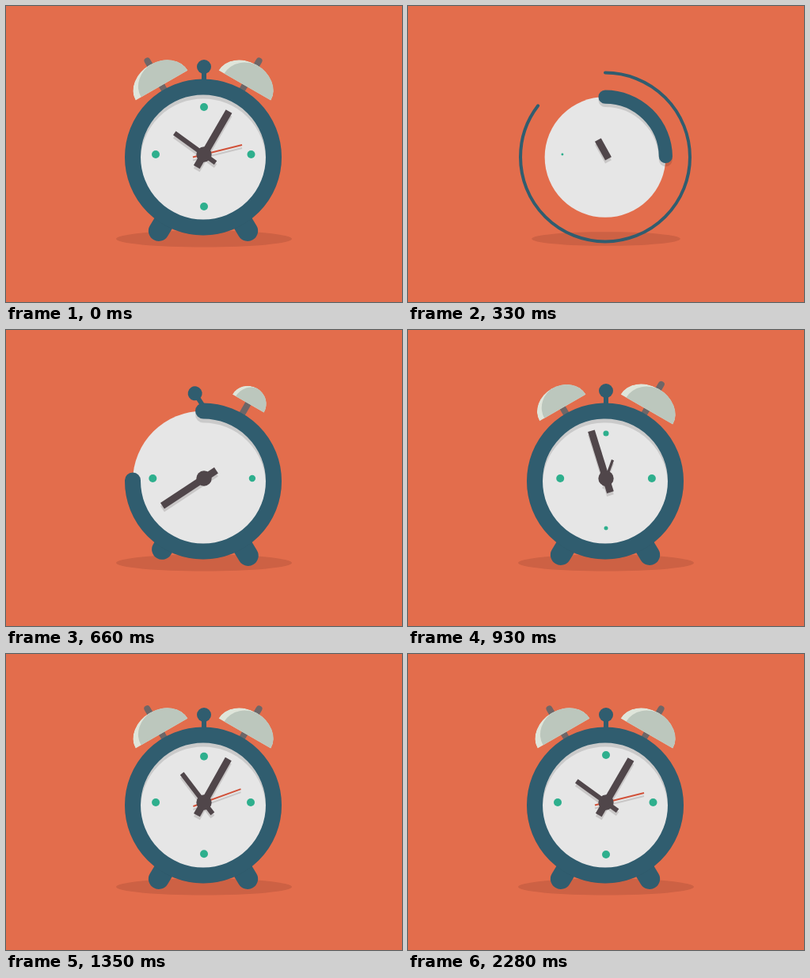
Write an HTML page with a canvas that moves like this. It is 500 px wide and 375 px high and loops after 2.58 s.

```html
<!DOCTYPE html>
<html lang="en">
<head>
<meta charset="utf-8">
<title>Alarm clock</title>
<style>
  html, body { margin: 0; width: 100%; height: 100%; overflow: hidden; background: #e36d4c; }
  canvas { display: block; }
</style>
</head>
<body>
<canvas id="stage" width="500" height="375"></canvas>
<script>
const ctx = document.getElementById('stage').getContext('2d');
const LOOP = 2580, STEP = 30, TAU = Math.PI * 2, DEG = Math.PI / 180;
const CENTER = [249, 191.5], PIVOT = [250, 188];
const TEAL = '#305d6f', DARK = '#50464a', METAL = '#6e6667', SHADE = '#c9c7c7';

// Progress helpers
const span = (t, start, length) => Math.min(1, Math.max(0, (t - start) / length));
const easeOut = (u, power = 3) => 1 - (1 - u) ** power;
const smooth = u => u * u * (3 - 2 * u);
const backOut = u => 1 + 2.7 * (u - 1) ** 3 + 1.7 * (u - 1) ** 2;

// Drawing helpers
function placed([x, y], degrees, draw) {
  ctx.save();
  ctx.translate(x, y);
  ctx.rotate(degrees * DEG);
  draw();
  ctx.restore();
}

function oval(x, y, rx, ry, color) {
  ctx.fillStyle = color;
  ctx.beginPath();
  ctx.ellipse(x, y, Math.max(0, rx), Math.max(0, ry), 0, 0, TAU);
  ctx.fill();
}

const disc = (x, y, r, color) => oval(x, y, r, r, color);

// A line along the local "up" axis
function bar(from, to, width, color, cap = 'butt') {
  ctx.strokeStyle = color;
  ctx.lineWidth = width;
  ctx.lineCap = cap;
  ctx.beginPath();
  ctx.moveTo(0, -from);
  ctx.lineTo(0, -to);
  ctx.stroke();
}

// An arc from one fraction of a turn to another, clockwise from the top
function arc(r, from, to, width, color, dy = 0) {
  if (to <= from) return;
  ctx.strokeStyle = color;
  ctx.lineWidth = width;
  ctx.lineCap = 'round';
  ctx.beginPath();
  ctx.arc(0, dy, r, (from - 0.25) * TAU, (to - 0.25) * TAU);
  ctx.stroke();
}

function outline(t) {
  const r = 115 * easeOut(span(t, 30, 510));
  placed(CENTER, 0, () =>
    arc(r, smooth(span(t, 330, 210)), smooth(span(t, 30, 395)), 4, TEAL));
}

function foot(t, angle, start) {
  if (t < start) return;
  const reach = 85 + 24 * backOut(span(t, start, 250));
  placed(CENTER, angle, () => bar(70, reach, 26, TEAL, 'round'));
}

function bell(t, angle, start, pinStart) {
  if (t < start) return;
  const s = easeOut(span(t, start, 300));
  const base = 105 + 22 * (1 - s);
  placed(CENTER, angle, () => {
    bar(80, base + 2, 8, METAL);
    if (t > pinStart) bar(base, 120 + 21 * backOut(span(t, pinStart, 300)), 8, METAL, 'round');
    ctx.translate(0, -base);
    ctx.scale(s, s ** 0.6);
    ctx.beginPath();
    ctx.ellipse(0, 0, 38, 30, 0, Math.PI, TAU);
    ctx.clip();
    oval(0, 0, 38, 30, '#dfe5da');
    oval(4, 0, 34, 30, '#bcc7bd');
  });
}

function knob(t) {
  const s = span(t, 600, 40);
  if (!s) return;
  placed([250, 98], -90 * (1 - backOut(span(t, 615, 260))), () => {
    bar(0, 21 * s, 6, TEAL);
    disc(0, -21 * s, 9 * s, TEAL);
  });
}

function body(t) {
  const s = easeOut(span(t, 30, 510), 2.2);
  const sweep = smooth(span(t, 24, 942));
  placed(CENTER, 0, () => {
    ctx.scale(s, s);
    disc(0, 0, 89, '#e6e6e6');
    ctx.save();
    ctx.beginPath();
    ctx.arc(0, 0, 99, 0, TAU);
    ctx.clip();
    arc(89, 0, sweep, 20, 'rgba(0,0,0,.12)', 5);
    ctx.restore();
    arc(89, 0, sweep, 20, TEAL);
  });
}

function dot(t, dx, dy, distance, start, swing) {
  const age = t - start;
  if (age <= 0) return;
  const decay = Math.max(0, 1 - age / 1350);
  const d = distance - swing * decay * Math.cos(age / 600 * TAU);
  disc(PIVOT[0] + dx * d, PIVOT[1] + dy * d, 5 * span(age, 0, 120), '#2eaf8d');
}

function hands(t, shadow) {
  const dark = shadow ? SHADE : DARK;
  const center = [PIVOT[0], PIVOT[1] + (shadow ? 4 : 0)];

  const hour = span(t, 857, 135);
  if (hour) placed(center, -54 + 90 * (1 - span(t, 857, 1150)) ** 3, () =>
    bar(-18 * hour, 46 * hour, 6 * hour, dark));

  const minute = span(t, 300, 90);
  if (minute) placed(center, 30 - 450 * (1 - span(t, 302, 1188)) ** 3, () =>
    bar(-18.5 * minute, 63 * minute, 9, dark));

  const second = span(t, 1000, 150);
  const ticks = span(t, 1190, 90) + span(t, 2190, 90);
  if (second) placed(center, 64 + 6 * ticks, () =>
    bar(-14.5 * second, 49.5 * second, 2, shadow ? SHADE : '#d1523a'));

  if (t > 345 && !shadow) disc(...center, 9.7 * backOut(span(t, 345, 120)), dark);
}

function draw(t) {
  ctx.fillStyle = '#e36d4c';
  ctx.fillRect(0, 0, 500, 375);
  const ground = easeOut(span(t, 30, 510), 2.1);
  oval(250, 295, 111 * ground, 10.5 * ground, '#cd6144');
  outline(t);
  foot(t, 149, 460);
  foot(t, 211, 615);
  bell(t, 30, 580, 810);
  bell(t, -30, 775, 1080);
  knob(t);
  body(t);
  dot(t, -1, 0, 61, 295, 6.5);
  dot(t, 1, 0, 59.5, 560, -3);
  dot(t, 0, -1, 60, 845, 5);
  dot(t, 0, 1, 66, 870, 4);
  hands(t, true);
  hands(t, false);
}

const begin = performance.now();
function tick() {
  const t = Math.floor((performance.now() - begin) % LOOP / STEP) * STEP;
  draw(t || LOOP); // the loop opens on the finished clock
  requestAnimationFrame(tick);
}
tick();
</script>
</body>
</html>
```
